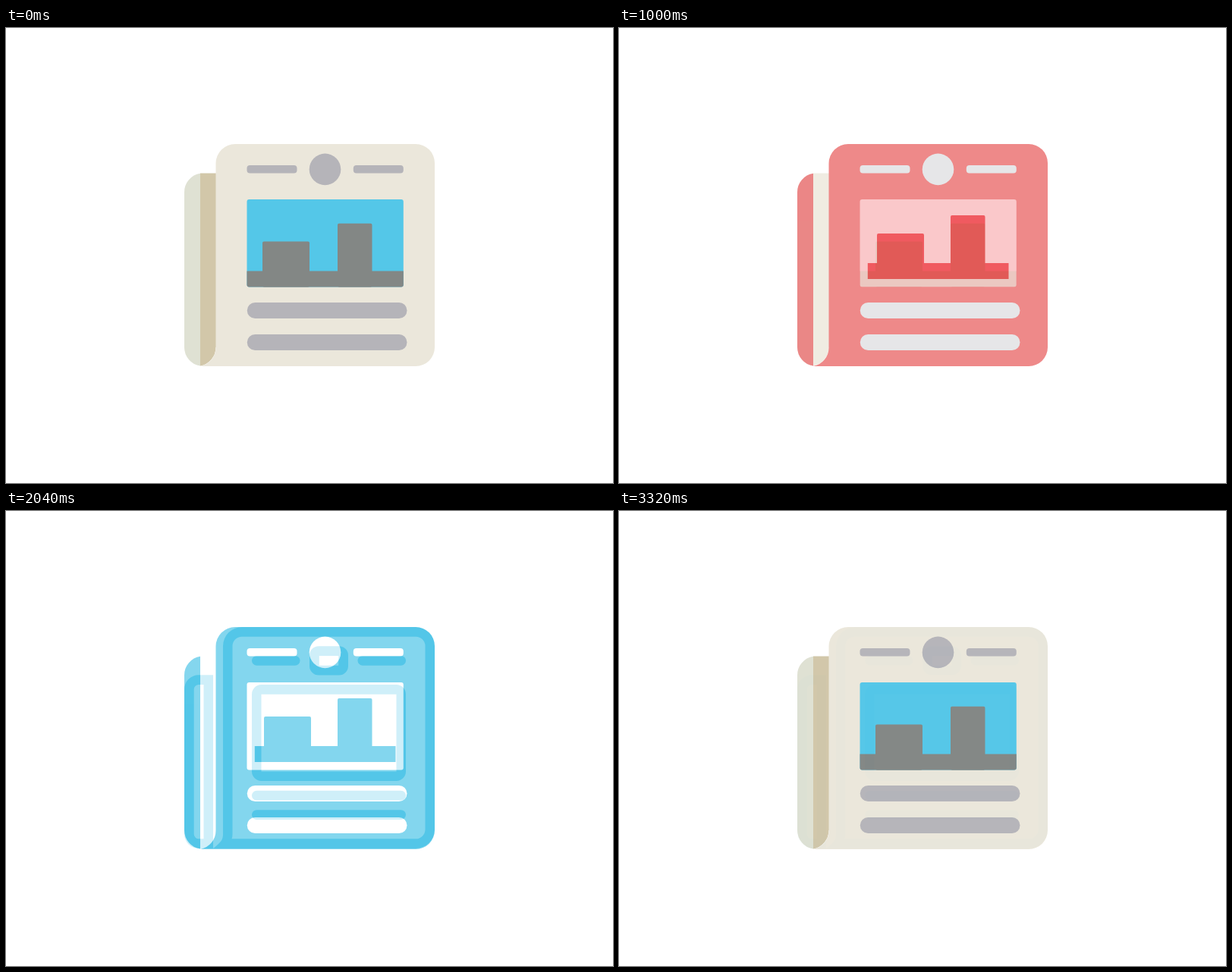
An HTML page that plays this animation: 800 by 600 pixels, repeating every 3340 ms.

```html
<!DOCTYPE html>
<html lang="en">
<head>
<meta charset="utf-8">
<title>Newspaper icon</title>
<style>
  html, body { margin: 0; width: 100%; height: 100%; overflow: hidden; background: #fff; }
  svg { display: block; width: 100vw; height: 100vh; }
  .ink { fill: #b5b4b9; }
  .gap { fill: #fff; }
  #sky { fill: #54c7e8; }
  #city { fill: #838785; }
  #solid { opacity: 0; fill: #f15a60; }
  #outline { opacity: 0; fill: #54c7e8; }
</style>
</head>
<body>
<svg viewBox="0 0 800 600" xmlns="http://www.w3.org/2000/svg">
  <defs>
    <path id="page" d="M302 153H540A25 25 0 0 1 565 178V421A25 25 0 0 1 540 446H256A25 25 0 0 0 276.5 421V178.500A25.500 25.500 0 0 1 302 153Z"/>
    <path id="spine" d="M256 191.800A25 25 0 0 0 235 216.500V421A25 25 0 0 0 256 445.600Z"/>
    <g id="print">
      <rect x="317.500" y="181" width="66" height="10.500" rx="4"/>
      <circle cx="420.500" cy="186.400" r="20.800"/>
      <rect x="457.800" y="181" width="66" height="10.500" rx="4"/>
      <rect x="317.800" y="362" width="210.700" height="21" rx="10.500"/>
      <rect x="317.800" y="404" width="210.700" height="21" rx="10.500"/>
    </g>
    <rect id="photo" x="317.500" y="226" width="206.300" height="115.500" rx="3"/>
  </defs>

  <g id="flat">
    <path fill="#d2c7a9" d="M256 191.500H278V421H276.500A25 25 0 0 1 256 445.600Z"/>
    <use href="#spine" fill="#dfe1d3"/>
    <use href="#page" fill="#ebe7db"/>
    <use href="#print" class="ink"/>
    <use href="#photo" id="sky"/>
    <g id="city">
      <rect x="338" y="281.500" width="62" height="60" rx="2"/>
      <rect x="437" y="257.700" width="45.500" height="83.800" rx="2"/>
      <path d="M317.500 320.500H523.800V338.500A3 3 0 0 1 520.800 341.500H320.500A3 3 0 0 1 317.500 338.500Z"/>
    </g>
  </g>

  <g id="solid">
    <rect class="gap" width="800" height="600"/>
    <use href="#spine"/>
    <use href="#page"/>
    <use href="#print" class="gap"/>
    <use href="#photo" class="gap"/>
    <rect x="340" y="271" width="62" height="50" rx="2"/>
    <rect x="437" y="247" width="45.500" height="74" rx="2"/>
    <rect x="327.800" y="310" width="185.700" height="21"/>
  </g>

  <g id="outline" fill-rule="evenodd">
    <rect class="gap" width="800" height="600"/>
    <path d="M311 153H540A25 25 0 0 1 565 178V420A25 25 0 0 1 540 445H273C283 437 286 434 286 426V178A25 25 0 0 1 311 153ZM311 165.700A12.500 12.500 0 0 0 298.500 178.200V426Q298.500 430 297.500 432.300H540A12.500 12.500 0 0 0 552.500 419.800V178.200A12.500 12.500 0 0 0 540 165.700Z"/>
    <path d="M273 216.300H254A19 19 0 0 0 235 235.300V426A19 19 0 0 0 254 445H273ZM260.500 229V432.300H254A6.300 6.300 0 0 1 247.700 426V235.300A6.300 6.300 0 0 1 254 229Z"/>
    <path d="M412 178.300H439A12 12 0 0 1 451 190.300V204.500A12 12 0 0 1 439 216.500H412A12 12 0 0 1 400 204.500V190.300A12 12 0 0 1 412 178.300ZM412.800 191V203.700H438.200V191Z"/>
    <path d="M336.500 229H514.500A12.500 12.500 0 0 1 527 241.500V343.500A12.500 12.500 0 0 1 514.500 356H336.500A12.500 12.500 0 0 1 324 343.500V241.500A12.500 12.500 0 0 1 336.500 229ZM336.500 241.700V343.500H514.500V241.700Z"/>
    <rect x="324" y="191" width="63.500" height="12.700" rx="6.350"/>
    <rect x="463.500" y="191" width="63.500" height="12.700" rx="6.350"/>
    <rect x="324" y="368.800" width="203" height="12.700" rx="6.350"/>
    <rect x="324" y="394.200" width="203" height="12.700" rx="6.350"/>
  </g>
</svg>
<script>
  const LOOP = 3340;
  const BLUE = '#54c7e8', LIME = '#b2d77b', RED = '#f15a60';

  // steps: [time in ms, value]
  function run(id, prop, steps) {
    const frames = steps.map(([t, value]) => ({ offset: t / LOOP, [prop]: value }));
    document.getElementById(id).animate(frames, { duration: LOOP, iterations: Infinity });
  }

  run('sky', 'fill', [[0, BLUE], [400, LIME], [800, RED], [2400, RED], [2400, BLUE], [LOOP, BLUE]]);
  run('city', 'fill', [[0, '#838785'], [400, '#59be6e'], [800, '#c35a46'],
    [2400, '#c35a46'], [2400, '#838785'], [LOOP, '#838785']]);
  run('solid', 'fill', [[0, RED], [1100, RED], [1500, LIME], [1900, BLUE], [LOOP, BLUE]]);
  run('solid', 'opacity', [[0, 0], [800, 0], [1100, 1], [2400, 1], [2400, 0], [LOOP, 0]]);
  run('outline', 'opacity', [[0, 0], [1900, 0], [2400, 1], [2770, 1], [3330, 0], [LOOP, 0]]);
</script>
</body>
</html>
```
